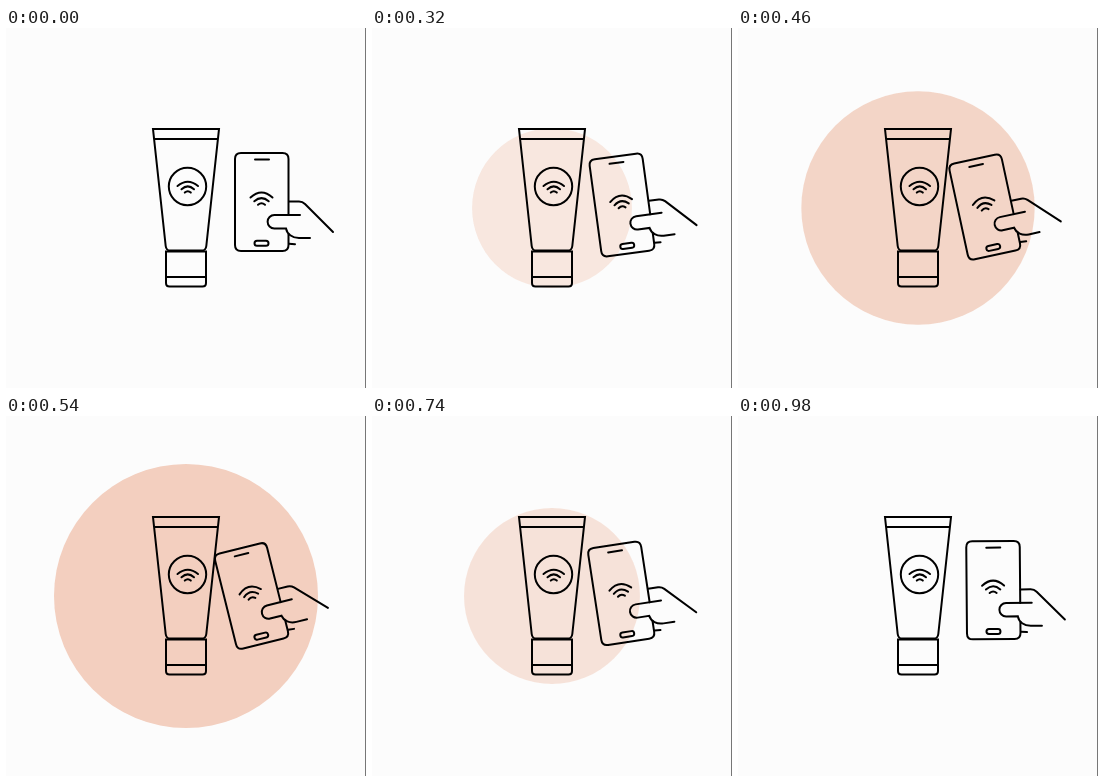
These frames come from a looping animation (360x360 px, 1 s). An HTML page:

```html
<!DOCTYPE html>
<html lang="en">
<head>
<meta charset="utf-8">
<title>Tap to scan</title>
<style>
html, body { margin: 0; width: 100%; height: 100%; overflow: hidden; background: #fcfcfc; }
svg { display: block; width: 100vw; height: 100vh; }
</style>
</head>
<body>
<svg viewBox="0 0 360 360">
  <circle id="glow" cx="180" cy="180" fill="#f3cfbf"/>
  <path d="M359.5 0V360" stroke="#777"/>
  <g fill="none" stroke="#000" stroke-width="2" stroke-linecap="round">
    <!-- tube -->
    <path d="M147 101H213L200.3 218Q199.8 222.5 196 222.5H164Q160.200 222.5 159.7 218ZM148.500 111H211.500"/>
    <path d="M160 223.500H200V255Q200 258.500 196.500 258.500H163.500Q160 258.500 160 255ZM160 249H200"/>
    <circle cx="181.500" cy="158.500" r="18.700"/>
    <path d="M171.500 158Q181.800 149.500 192 158M175.500 161.300Q181.800 155.500 188 161.300M178.800 164.600Q181.800 161.800 184.800 164.600"/>
    <!-- phone and hand -->
    <g id="phone">
      <path d="M282.500 187V131Q282.500 125 276.500 125H235Q229 125 229 131V217Q229 223 235 223H276.500Q282.500 223 282.500 217V206"/>
      <path d="M249 131.500H263"/>
      <rect x="248.500" y="212.800" width="14" height="5" rx="2.500"/>
      <path d="M244.500 169.500Q255.500 159.500 266.500 169.500M248.300 173.300Q255.500 167 262.700 173.300M252 176.800Q255.500 173.800 259 176.800"/>
      <path d="M294 187H268.300A6.700 6.700 0 0 0 268.300 200.400H280C281 206 286 210 293 210H304"/>
      <path d="M283 173.500H293Q296.500 173.500 299 176L327 204M283 215.700L289 216.200"/>
    </g>
  </g>
</svg>
<script>
const glow = document.getElementById('glow');
const phone = document.getElementById('phone');
const LOOP = 1000, PEAK = 540, STEP = 20;

// cubic from 0 to 1 with given start and end slopes
const ease = (x, a, b) =>
  x * x * (3 - 2 * x) + a * x * (1 - x) ** 2 - b * x * x * (1 - x);

function draw(now) {
  const t = Math.floor(now % LOOP / STEP) * STEP;
  const p = t < PEAK
    ? ease(t / PEAK, 0.14, 0.7)
    : 1 - ease((t - PEAK) / (LOOP - PEAK), 0.41, 0.75);
  glow.setAttribute('r', 16 + 116 * p);
  glow.setAttribute('opacity', Math.max(0, (p - 0.13) / 0.87));
  phone.setAttribute('transform', `rotate(${-14 * p} 275 218.5)`);
}

let start;
function tick(now) {
  start ??= now;
  draw(now - start);
  requestAnimationFrame(tick);
}
draw(0);
requestAnimationFrame(tick);
</script>
</body>
</html>
```
